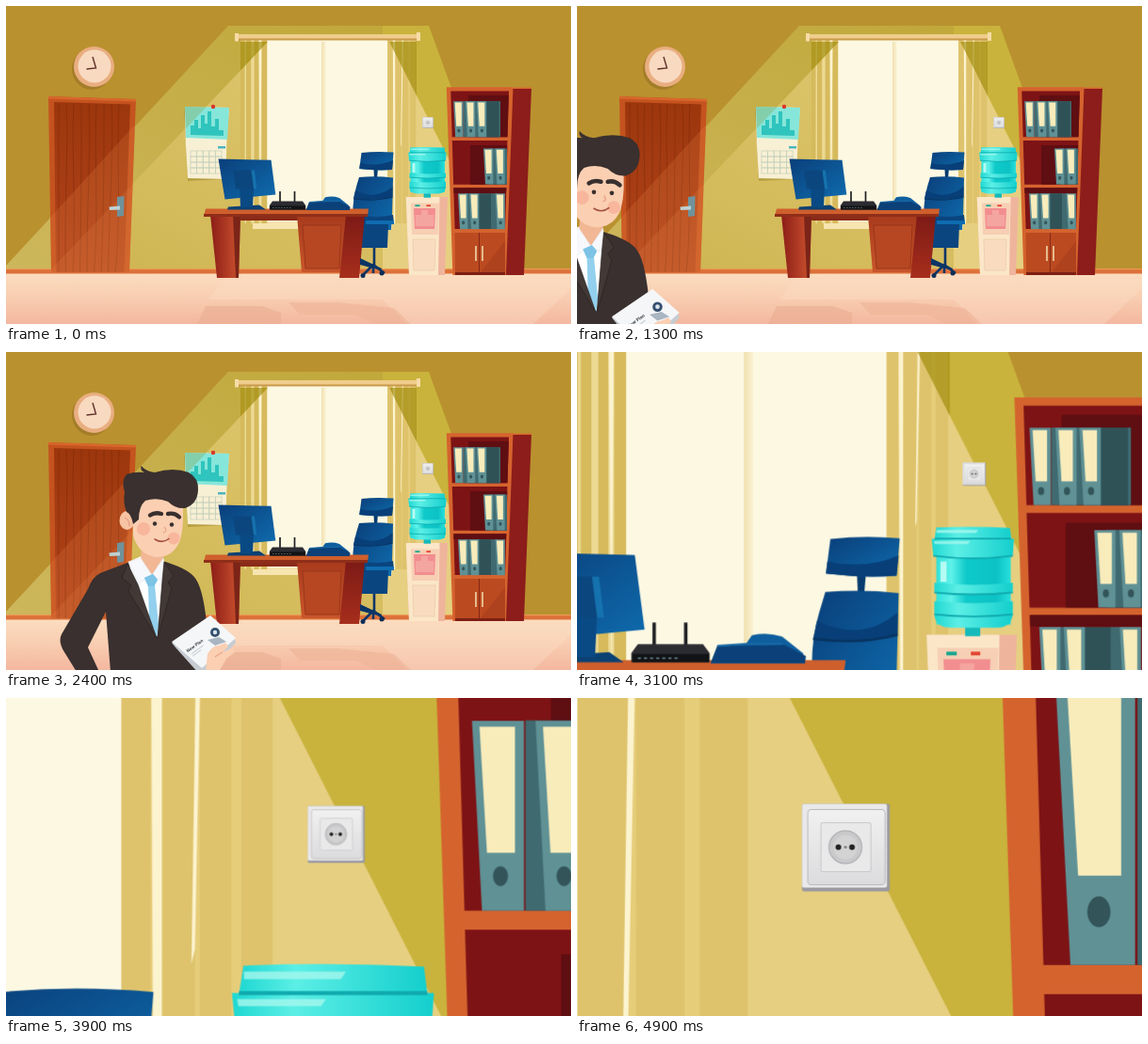
These frames come from a looping animation (600x338 px, 5000 ms). An HTML page:

```html
<!DOCTYPE html>
<html lang="en">
<head>
<meta charset="utf-8">
<title>Office</title>
<style>
html, body { margin: 0; width: 100%; height: 100%; overflow: hidden; background: #b9912f; }
svg { display: block; width: 100%; height: 100%; }
#camera, #man { transform-origin: 0 0; transform-box: view-box; }
#camera { animation: zoom 5s infinite; }
#man { animation: enter 5s infinite; }
@keyframes zoom {
  0%, 48% { transform: translate(0px, 0px) scale(1); animation-timing-function: cubic-bezier(.365, 0, .73, .59); }
  78% { transform: translate(-2026.6px, -513.2px) scale(5.306); animation-timing-function: cubic-bezier(.3, .5, .53, 1); }
  100% { transform: translate(-3389px, -858.2px) scale(8.2); }
}
@keyframes enter {
  0%, 14% { transform: translate(-270px, 9px) scale(1.1); animation-timing-function: linear; }
  26% { transform: translate(-148.9px, 5.3px) scale(1.055); animation-timing-function: cubic-bezier(.4, .43, .7, 1); }
  42%, 100% { transform: translate(0px, 0px) scale(1); }
}
</style>
</head>
<body>
<svg viewBox="0 0 600 338" preserveAspectRatio="none">
<defs>
  <linearGradient id="floor" x2="0" y2="1">
    <stop stop-color="#fbdcbf"/><stop offset=".4" stop-color="#f9d0b3"/><stop offset="1" stop-color="#f3b79f"/>
  </linearGradient>
  <linearGradient id="post"><stop stop-color="#f0e0ac"/><stop offset="1" stop-color="#fbf3d6"/></linearGradient>
  <linearGradient id="ray" x1="1" x2=".2" y2="1"><stop stop-color="#e0c872"/><stop offset="1" stop-color="#cfb653"/></linearGradient>
  <linearGradient id="haze" x1="1" x2="0" y2="1"><stop stop-color="#c0a83a"/><stop offset="1" stop-color="#cdb75c"/></linearGradient>
  <linearGradient id="wood" x2="0" y2="1"><stop stop-color="#9c360c"/><stop offset="1" stop-color="#b3441c"/></linearGradient>
  <linearGradient id="leg"><stop stop-color="#8c1d17"/><stop offset=".8" stop-color="#c0492a"/></linearGradient>
  <linearGradient id="desk" x2="0" y2="1"><stop stop-color="#a83a1c"/><stop offset="1" stop-color="#c9552a"/></linearGradient>
  <linearGradient id="side" x2="0" y2="1"><stop stop-color="#7d1a16"/><stop offset="1" stop-color="#a62e1c"/></linearGradient>
  <linearGradient id="blue" x2="1" y2="1"><stop stop-color="#0a3f7a"/><stop offset="1" stop-color="#0f6cae"/></linearGradient>
  <linearGradient id="water"><stop stop-color="#2fe2da"/><stop offset=".2" stop-color="#5ff2ea"/><stop offset=".4" stop-color="#0fcaca"/><stop offset=".8" stop-color="#0cc2c4"/><stop offset="1" stop-color="#27e0dc"/></linearGradient>
  <linearGradient id="ring"><stop stop-color="#1fd8d2"/><stop offset=".3" stop-color="#5cefe6"/><stop offset="1" stop-color="#14cfcd"/></linearGradient>
  <linearGradient id="plate" x2="0" y2="1"><stop stop-color="#f1f1f1"/><stop offset="1" stop-color="#dcdcde"/></linearGradient>
  <clipPath id="doorShape"><path d="M45 96L138 99L131 283H48Z"/></clipPath>
  <g id="binder">
    <path d="M0 0H10.4V38H2Z" fill="#5f9195"/>
    <path d="M1.5 1.2H8.6V26.4H3Z" fill="#f8ecbb"/>
    <ellipse cx="5.7" cy="31.1" rx="1.5" ry="2" fill="#33555a"/>
  </g>
</defs>

<g id="camera">
  <rect width="600" height="338" fill="#b9912f"/>
  <path d="M236 21H410V282H0V276Z" fill="url(#haze)"/>
  <path d="M400 21H449L544 282H400Z" fill="#c9b33c"/>
  <path d="M278 38L46 282H400V38Z" fill="url(#ray)"/>
  <path d="M407 38L530.7 282H400V38Z" fill="#e6cf80"/>
  <rect y="279" width="600" height="6" fill="#dd7038"/>
  <rect y="279" width="600" height="1.2" fill="#eb9a55"/>
  <rect y="284.5" width="600" height="54" fill="url(#floor)"/>
  <path d="M232 290H600V300L560 338H425L400 312H215Z" fill="#fbdcc3" opacity=".4"/>
  <path d="M203 338L212 319H272L292 326V338Z" fill="#e9ae92" opacity=".6"/>
  <path d="M300 315H352L412 321L430 338H392L372 328H312Z" fill="#efb598" opacity=".6"/>

  <!-- window and curtains -->
  <path d="M262 228H410V237H262Z" fill="#f6e5af"/>
  <rect x="276" y="36" width="130" height="193" fill="#fdf8e2"/>
  <rect x="335" y="38" width="4.7" height="190" fill="url(#post)"/>
  <g id="curtains"></g>
  <path d="M278 38L249 68.5V38ZM407 38H436V95.2Z" fill="#9c8600" opacity=".62"/>
  <path d="M243 30H440V36H243Z" fill="#efcd8c"/>
  <path d="M243 34.5H440V36.5H243Z" fill="#c99a4c"/>
  <path d="M243 29H247V37.5H243ZM436 28H440V37H436Z" fill="#f6dca6"/>

  <!-- clock -->
  <ellipse cx="91" cy="67" rx="21" ry="22" fill="#9c7526" opacity=".7"/>
  <circle cx="93.5" cy="64.5" r="21.5" fill="#e9ae80"/>
  <circle cx="94" cy="64" r="17.5" fill="#f8dac0"/>
  <path d="M92 54L95.5 66L85.5 67" fill="none" stroke="#61302a" stroke-width="1.4"/>

  <!-- door -->
  <g clip-path="url(#doorShape)">
    <rect x="40" y="90" width="105" height="200" fill="#c5531f"/>
    <path d="M51 102L132 104.5L125.5 283H53Z" fill="url(#wood)"/>
    <g id="grain" fill="none" stroke="#7e2b0c" stroke-width=".9" opacity=".6"></g>
    <path d="M138 125L45 227V283H131Z" fill="#f2934f" opacity=".17"/>
    <path d="M138 185.400L45 283H138Z" fill="#f2934f" opacity=".15"/>
    <path d="M45 96L138 99V101.500L45 98.500Z" fill="#d9682c"/>
  </g>
  <path d="M118 203L125.500 202L125 223L118 224Z" fill="#6f929b"/>
  <path d="M109.500 213.500L121 212.500V216.500L110 217Z" fill="#bcd2d4"/>

  <!-- calendar -->
  <path d="M189 110L193 186L232 184L230 182Z" fill="#a68c33" opacity=".6"/>
  <path d="M190 107L237 108Q233 150 234 184L193 183Q190 145 190 107Z" fill="#f8f0d4"/>
  <path d="M190 107L237 108L235 142L191 140Z" fill="#86e6da"/>
  <path d="M196 137V127H200V121H204V130H207V116H211V125H214V112H218V128H222V120H226V132H231V138Z" fill="#2fc4bd"/>
  <path d="M225 149H233V151.500H225Z" fill="#4cb5bd"/>
  <g id="days" fill="none" stroke="#c3cfba" stroke-width=".7"></g>
  <path d="M190 107H213L191 130Z" fill="#7f8a20" opacity=".25"/>
  <circle cx="220" cy="107" r="2.200" fill="#d8352a"/>

  <!-- socket -->
  <g transform="translate(448 124) scale(.1224)">
    <rect x="-46" y="-46" width="93" height="93" rx="2" fill="#9b9aa0"/>
    <rect x="-46" y="-46" width="90" height="89" rx="2" fill="#e9e9ea"/>
    <rect x="-40" y="-40" width="82" height="80" rx="4" fill="url(#plate)" stroke="#b9b9bd"/>
    <rect x="-26" y="-26" width="53" height="52" rx="2" fill="#e9e9ea" stroke="#c9c9cc"/>
    <circle r="17.500" fill="#c9c9cb" stroke="#aaaaae"/>
    <circle r="13" fill="#d3d3d4"/>
    <circle cx="-7.500" r="3" fill="#222"/><circle cx="7" r="3" fill="#222"/>
    <circle r="2.300" fill="#8c8c90" stroke="#eee" stroke-width=".8"/>
  </g>

  <!-- bookcase -->
  <path d="M536 87H558L550 286H529Z" fill="#8c1d1a"/>
  <path d="M468 86.400H558V88H468Z" fill="#d9682f"/>
  <path d="M467.800 86.400H538.500L531 286H474.400Z" fill="#d5632e"/>
  <path d="M472.300 90.500H534L532.500 139.300H473.700Z" fill="#7d1315"/>
  <path d="M491 95H533.800L532.500 139.300H491Z" fill="#5f0e12"/>
  <path d="M473.800 143.100H532.400L531.500 189.700H475.200Z" fill="#7d1315"/>
  <path d="M493 148H532.200L531.500 189.700H493Z" fill="#5f0e12"/>
  <path d="M475.300 193.300H531.400L530 237H476.600Z" fill="#7d1315"/>
  <path d="M475.400 193.300H531.400L531 199H475.500Z" fill="#5f0e12"/>
  <path d="M485.900 101.200H525V139.300H485.900Z" fill="#3f6a70"/>
  <path d="M510.400 101.200H523.500V139.300H510.400Z" fill="#2f5257"/>
  <use href="#binder" x="475.200" y="101.300"/><use href="#binder" x="487.900" y="101.300"/><use href="#binder" x="499.700" y="101.300"/>
  <path d="M513 151.500H532V189.700H513Z" fill="#3f6a70"/>
  <use href="#binder" x="507" y="151.600"/><use href="#binder" x="519.300" y="151.600"/>
  <path d="M487 199.200H522V237H487Z" fill="#3f6a70"/>
  <use href="#binder" x="480" y="199.200"/><use href="#binder" x="492" y="199.200"/>
  <path d="M502.500 199.200H515V237H502.500Z" fill="#2f5257"/>
  <use href="#binder" x="519.500" y="199.200"/>
  <path d="M476.500 241H530V283H477Z" fill="#bb4a20"/>
  <path d="M477 283H530V286H477Z" fill="#7d1f14"/>
  <path d="M502.500 241V283" stroke="#7f2413" stroke-width=".9"/>
  <path d="M499 255V271M506 255V271" stroke="#f4dfb0" stroke-width="1.500"/>
  <path d="M504 283L530 250V283Z" fill="#a33a1b" opacity=".5"/>

  <!-- water cooler -->
  <path d="M425 203H469L466 286H428Z" fill="#efb49c"/>
  <path d="M424.700 203H460.500L459 286H428Z" fill="#fbe6c8"/>
  <path d="M430 209.500H460L459 243H431Z" fill="#f7cfb4"/>
  <path d="M433 215H456L455 237H434Z" fill="#f28d90"/>
  <path d="M435 222H441V217H448V222H454V234H435Z" fill="#f5a5a0"/>
  <path d="M434.400 211.300H439.500V213.100H434.400Z" fill="#18a58e"/>
  <path d="M446.400 211.300H451V213.100H446.400Z" fill="#e2432f"/>
  <path d="M432 248H456L455 281H433Z" fill="#f9dcc0" stroke="#f0cfae"/>
  <path d="M443.600 197H451V203.700H443.600Z" fill="#14b9b9"/>
  <rect x="429.500" y="156" width="36.500" height="42" fill="url(#water)"/>
  <g fill="url(#ring)">
    <path d="M429.500 150.300Q447.500 149.600 465.600 150.500L466.300 156H428.600Z"/>
    <path d="M427.200 155.800H467.600L467 164Q447.500 166.500 428 164Z"/>
    <path d="M428.500 177.500Q447.500 179.500 467 177.500V182Q447.500 184 428.500 182Z"/>
    <path d="M428.500 186.500Q447.500 188.500 467 186.500V193Q466 199.500 459 199.500H437Q429 199.500 428.500 193Z"/>
  </g>
  <path d="M428.600 155.800H466.300M428 164.200Q447.500 166.700 467 164.200M428.500 182.200Q447.500 184.200 467 182.200M428.500 193Q447.500 195 467 193" fill="none" stroke="#0fa9ae" stroke-width=".8"/>
  <path d="M431.500 167H434.500V177H431.500Z" fill="#b5fbf3"/>
  <path d="M429.600 151.500H450L449 153H429.600ZM428.200 157H446L445 158.400H428.500Z" fill="#a6f8ee" opacity=".8"/>

  <!-- chair -->
  <path d="M391 256V275M379 286L390 275L402 284M390 274V284" fill="none" stroke="#0c3566" stroke-width="2.600"/>
  <circle cx="379" cy="286.500" r="2.500" fill="#0c2d55"/><circle cx="399" cy="284" r="2.500" fill="#0c2d55"/>
  <path d="M390.500 172H395L394 184H391Z" fill="#083c70"/>
  <path d="M377.500 156Q394 154 411.500 155.600L410 174Q393 175.200 375.300 173Z" fill="url(#blue)"/>
  <path d="M376 167Q395 171 411 164L410 174Q393 175.200 375.300 173Z" fill="#083f78"/>
  <path d="M375 182Q393 180.500 411 182.500L410 222L409 238H370Q366 212 372 192Z" fill="url(#blue)"/>
  <path d="M371 196Q393 207 410.500 192V203Q392 207 369 205Z" fill="#083f78"/>
  <path d="M369 205Q392 208 410.500 203" fill="none" stroke="#073461" stroke-width="1.200"/>
  <path d="M375 222Q393 226 411 222L412 232H406L405 257H370V240Z" fill="#0a4580"/>
  <path d="M382 228H412V232H382Z" fill="#0f6cb0"/>

  <!-- desk -->
  <path d="M217 222H249L247 289H224Z" fill="url(#leg)"/>
  <path d="M241 222H249L247 289H244Z" fill="#7b2418"/>
  <path d="M249 222H310V228H249Z" fill="#8a2b18"/>
  <path d="M309 222H362L358 283H314Z" fill="url(#desk)"/>
  <path d="M315 233H356L354 279H318Z" fill="#b64722" stroke="#93321a" stroke-width=".8"/>
  <path d="M361 222H381L375 289H354Z" fill="url(#side)"/>
  <path d="M376 268L399 279L398 281L376 275Z" fill="#0c3566"/>
  <path d="M212 215.500H385L384 223H210Z" fill="#cf5f2c"/>
  <path d="M210 221H384V224H210Z" fill="#8f2e19"/>

  <!-- things on the desk -->
  <path d="M236 213.500L269 211.500L276 216.500H235Z" fill="#0b4173"/>
  <path d="M225.500 162.500L281.500 163.800L286.300 200.500L232.500 205.500Z" fill="url(#blue)"/>
  <path d="M248 192H263L262 214H249Z" fill="#0a4a84"/>
  <path d="M241 174.500H264L266.500 194.500H244Z" fill="#0b477e"/>
  <path d="M260.500 174.500H264L266.500 194.500H263Z" fill="#1572ae"/>
  <path d="M291 197V209M306.500 197V209" stroke="#1f2024" stroke-width="1.700"/>
  <path d="M283 207.600H315L318.200 212V216.500H279.800V212Z" fill="#2b2c31"/>
  <path d="M280.300 212.500H318V216.500H280.300Z" fill="#121316"/>
  <path d="M283 214.500H303" stroke="#6c8b8a" stroke-width=".7" stroke-dasharray="1.500 1.500"/>
  <path d="M318.700 217L322 208.500L336 207.500L339 203.200Q347 201.500 354 204L364 212Q365.500 215 365 217Z" fill="#0f5f9f"/>
  <path d="M322 208.500L355 208L365.500 213.500L365 217H318.700Z" fill="#0b4178"/>
  <path d="M322 208.500L336 207.500H354" fill="none" stroke="#1768a5"/>

  <!-- visitor -->
  <g id="man">
    <path d="M129 224L100 235Q91 240 87 252L59 300Q55 308 62 319L75 340H99L87 314L106 276L111 340H226L213 288Q209 248 199 238Q190 229 166 222Z" fill="#39302f"/>
    <path d="M130 223L146 216L167 221L168 240L161 303L137 250Z" fill="#fff"/>
    <path d="M144 205H167V224L156 238L143 224Z" fill="#f2b795"/>
    <path d="M130 223L143 219L155 237L141 246ZM167 219L155 237L165 243L168 224Z" fill="#f7f8fb" stroke="#dfe3e8" stroke-width=".6"/>
    <path d="M147 240L156 236L161 242L158 248L162 290L160 304L152 286L151 249Z" fill="#92d0ee"/>
    <path d="M147 240L156 236L161 242L157 249L151 249Z" fill="#7cc3e6"/>
    <path d="M129 225L123 240L133 248L130 254L160 304L140 247ZM168 223L178 238L172 245L176 251L161 304L166 243Z" fill="#423836" stroke="#2a2322" stroke-width=".7"/>
    <ellipse cx="128.500" cy="179" rx="8" ry="10" fill="#f7c3a2"/>
    <path d="M126 176Q131 178 131 185" fill="none" stroke="#e39f80" stroke-width="1.200"/>
    <path d="M134 155H187Q190 182 185 200Q178 218 160 218Q141 216 135 195Z" fill="#fbcfb2"/>
    <circle cx="146" cy="188" r="7" fill="#f6a590" opacity=".6"/><circle cx="178" cy="198" r="6.500" fill="#f6a590" opacity=".6"/>
    <path d="M128 170Q124 160 126 149Q122 137 128 130Q136 127 147 128Q142 126 143.500 121Q149 127 158 128Q178 122 194 128Q205 134 204 147Q203 162 190 166Q180 167 172 159Q160 154 148 158Q141 164 141 178L135 183Q133 172 128 170Z" fill="#39302f"/>
    <path d="M153 173.500Q158 170 165 172M172 172Q179 170.500 184 175.500" fill="none" stroke="#39302f" stroke-width="4.400" stroke-linecap="round"/>
    <circle cx="158" cy="182.500" r="2.200" fill="#39302f"/><circle cx="176" cy="183.500" r="2.200" fill="#39302f"/>
    <path d="M168 186Q172 191 167 192" fill="none" stroke="#e9a587" stroke-width="1.300"/>
    <path d="M158 199Q166 204 173 198.500" fill="none" stroke="#a4503f" stroke-width="1.500" stroke-linecap="round"/>
    <path d="M176 309L180 314L205 342H214L244 309L243 305Z" fill="#c6ccd2"/>
    <path d="M176 308L217 280L244 304L208 336Z" fill="#f5f6f8"/>
    <g transform="rotate(-36 200 312)">
      <text x="190" y="314" font-family="Inter, sans-serif" font-size="4.500" font-weight="700" fill="#3b4047">New Plan</text>
      <path d="M192 317.500H208M192 320H203" stroke="#bcc4cb" stroke-width=".9"/>
    </g>
    <circle cx="222" cy="298" r="5" fill="#35506f"/><circle cx="222" cy="298" r="2.200" fill="#dce6ee"/>
    <path d="M214 306L226 303L234 308L222 312Z" fill="#a9b6c1"/>
    <path d="M212 340L214 321Q219 312 226 312L233 309L236 313L230 319L242 314L243 319L234 326L226 340Z" fill="#fbcfb2"/>
    <path d="M230 319L222 324" stroke="#e9a587"/>
  </g>
</g>
</svg>
<script>
const add = (id, tag, attrs) => {
  const el = document.createElementNS("http://www.w3.org/2000/svg", tag);
  for (const key in attrs) el.setAttribute(key, attrs[key]);
  document.getElementById(id).append(el);
};
const strip = (x1, x2, fill) => add("curtains", "rect", { x: x1, y: 36, width: x2 - x1, height: 195, fill });

strip(249, 277.2, "#ecda94");
strip(405.1, 435.3, "#e6cd7a");
[[249, 253.5], [255, 260.2], [263.6, 268.5], [271.4, 277.2]].forEach(([a, b]) => strip(a, b, "#d6ba5c"));
[[405.1, 410.9], [413.2, 419.8], [420.8, 427.1], [429.1, 435.3]].forEach(([a, b]) => strip(a, b, "#dec36c"));
add("curtains", "path", { d: "M410.8 36H413.2V231H411.7ZM422 36H420.8L419.1 150L419.8 147ZM268.5 36H271.4L270 231Z", fill: "#fcf3cf" });

for (let i = 0; i < 9; i++) {
  const x = 56 + i * 8, bend = 3 * Math.sin(i * 2.1);
  add("grain", "path", { d: `M${x} 104C${x + bend} 150 ${x - bend} 220 ${x - i * .5} 283` });
}
for (let row = 0; row < 4; row++)
  for (let col = 0; col < 5; col++)
    add("days", "rect", { x: 196 + col * 6.6, y: 154 + row * 6, width: 6.6, height: 6 });
</script>
</body>
</html>
```
